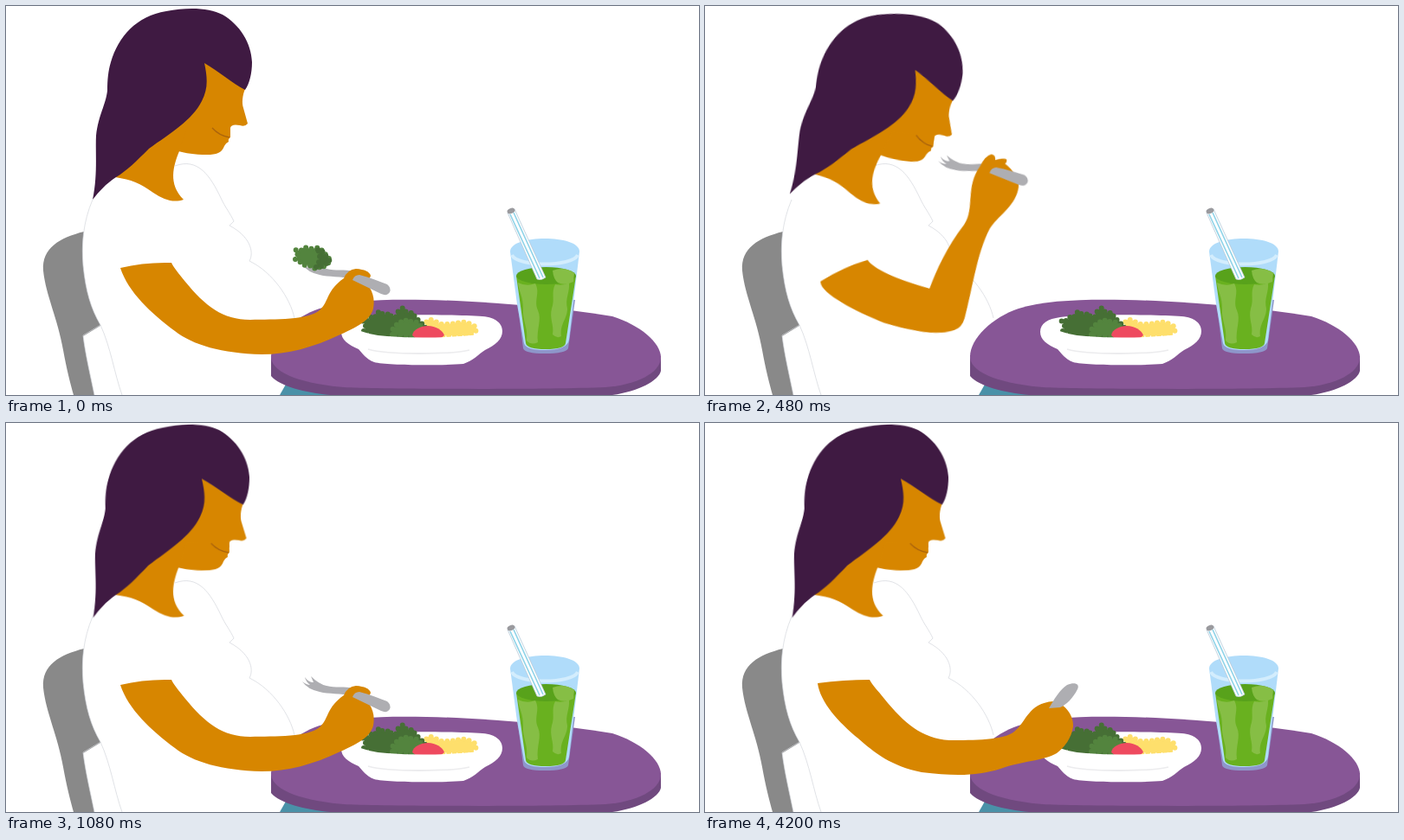
Recreate the animation shown at these times as an HTML page. Size 800x450 px, loop 4380 ms.

```html
<!DOCTYPE html>
<html lang="en">
<head>
<meta charset="utf-8">
<title>Healthy meal</title>
<style>
  html, body { margin: 0; width: 100%; height: 100%; overflow: hidden; background: #fff; }
  svg { display: block; width: 800px; height: 450px; }
  .skin { fill: #d78600; }
  .hair { fill: #3f1a42; }
  .steel { fill: #aeaeb2; }
  .seam { fill: none; stroke: #d3d6dc; stroke-width: .7; }
  .dark { fill: #466f35; stroke: #466f35; }
  .light { fill: #53843e; stroke: #53843e; }
  .corn { fill: #fedf6c; stroke: #fedf6c; }
  /* round dots along the edge make it frilly */
  .frill { stroke-width: 6; stroke-linecap: round; stroke-dasharray: 0 6.5; }

  .low, .mid, .high, .scoop, .food, .fork, .head, .shut, .open, .chew, .scooper {
    animation: 4.38s step-end infinite;
  }
  .low { animation-name: low; }
  .mid { animation-name: mid; }
  .high { animation-name: high; transform-origin: 200px 340px; }
  .scoop { animation-name: scoop; }
  .food { animation-name: food; }
  .fork { animation-name: fork; transform-origin: 390px 310px; }
  .head { animation-name: head; transform-origin: 160px 200px; }
  .shut { animation-name: shut; }
  .open { animation-name: open; }
  .chew { animation-name: chew; }

  @keyframes low {
    0%, 24.658% { opacity: 1; }
    3.653%, 95.89%, 100% { opacity: 0; }
  }
  @keyframes mid {
    0%, 7.306%, 24.658%, 100% { opacity: 0; }
    3.653%, 19.635% { opacity: 1; }
  }
  @keyframes high {
    0% { opacity: 0; transform: none; }
    7.306% { opacity: 1; transform: none; }
    10.959% { opacity: 1; transform: rotate(-4deg); }
    14.612% { opacity: 1; transform: translate(-3px, 2px); }
    19.635%, 100% { opacity: 0; transform: none; }
  }
  @keyframes scoop {
    0%, 100% { opacity: 0; }
    95.89% { opacity: 1; }
  }
  @keyframes food {
    0% { opacity: 1; }
    10.959%, 100% { opacity: 0; }
  }
  @keyframes fork {
    0%, 24.658% { opacity: 1; transform: none; }
    3.653%, 19.635% { opacity: 1; transform: translate(-21px, -68px); }
    7.306% { opacity: 1; transform: translate(-61px, -119px); }
    10.959% { opacity: 1; transform: translate(-72px, -123px) rotate(-4deg); }
    14.612% { opacity: 1; transform: translate(-62px, -119px) rotate(-2deg); }
    95.89%, 100% { opacity: 0; transform: none; }
  }
  @keyframes head {
    0% { transform: none; }
    10.959% { transform: rotate(6deg); }
    14.612%, 100% { transform: rotate(-1.27deg); }
  }
  @keyframes shut {
    0%, 10.959%, 24.658%, 34.703%, 44.749%, 54.795%, 100% { opacity: 1; }
    7.306%, 19.635%, 29.68%, 39.726%, 49.772% { opacity: 0; }
  }
  @keyframes open {
    0%, 10.959%, 100% { opacity: 0; }
    7.306% { opacity: 1; }
  }
  @keyframes chew {
    0%, 24.658%, 34.703%, 44.749%, 54.795%, 100% { opacity: 0; }
    19.635%, 29.68%, 39.726%, 49.772% { opacity: 1; }
  }
</style>
</head>
<body>
<svg viewBox="0 0 800 450">
  <!-- chair and clothes -->
  <path fill="#898989" d="M90 261C62 268 41 280 43 306C46 335 60 362 66 398C70 420 74 436 78 450H102C97 425 92 405 89 382L112 368V261Z"/>
  <path fill="#4a91a8" d="M324 436L316 450H376L345 438Z"/>
  <path fill="#fff" d="M100 224C89 250 87 275 89 300C92 330 98 350 109 369C121 395 125 425 134 450H316L333 361C328 338 308 308 281 295C287 284 281 266 258 254L263 249C250 228 235 182 205 182L150 190Z"/>
  <path class="seam" d="M100 224C89 250 87 275 89 300C92 330 98 350 109 369C121 395 125 425 134 450M109 369L89 381C92 405 97 425 102 450M195 185C222 175 236 197 248 222C253 233 259 240 263 249L258 254C281 266 287 284 281 295C308 308 328 338 333 361"/>

  <!-- table -->
  <path fill="#70497f" d="M306 404V428C316 440 345 447 374 450H700C730 446 754 433 756 422V405Z"/>
  <path fill="#875696" d="M306 407C305 385 332 360 362 350C400 338 460 339 520 341C580 344 640 349 700 359C732 369 757 390 756 408C754 424 730 438 692 441C620 444 430 443 390 441C345 437 308 426 306 407Z"/>

  <!-- plate -->
  <path fill="#fff" d="M387 377C387 367 396 362 410 360C440 356 520 357 550 359C566 360 573 368 573 376C573 386 565 392 553 398C545 403 540 410 528 414C500 416 440 416 425 412C415 408 412 402 407 397C395 392 387 386 387 377Z"/>
  <g class="frill">
    <path class="corn" d="M485 372Q483 362 492 363Q498 366 501 368Q514 368 521 367Q528 364 536 368Q543 370 543 375Q539 381 528 381H490Z"/>
    <path class="dark" d="M413 376Q418 370 411 364Q420 366 422 358Q429 362 430 353Q438 360 443 355Q444 361 450 360Q451 352 459 349Q460 356 471 355Q471 362 478 364Q480 369 484 370L482 382H430Z"/>
    <path class="light" d="M446 380Q444 374 450 371Q452 364 459 366Q464 360 468 366Q476 364 478 370Q485 372 480 382Z"/>
  </g>
  <path fill="#ee4a5f" d="M469 381C470 374 479 370 487 370C496 370 504 375 506 381L500 386H475Z"/>
  <path fill="#fff" d="M400 372Q418 381 440 382Q490 386 549 380L553 390Q480 402 405 389Z"/>
  <path fill="none" stroke="#ececee" stroke-width="1.8" d="M418 397Q435 402 477 402Q520 402 535 398"/>

  <!-- drink -->
  <path fill="#8e96ca" d="M590 340L597 396Q599 402 622 402Q646 402 649 396L657 340Z"/>
  <path fill="#b0dcfa" d="M582 284C582 264 662 264 662 284L654 352L650 386Q648 398 622 398Q600 398 598 390L590 345Z"/>
  <path fill="#69b11f" d="M589 312L600 390Q601 397 623 397Q645 397 646 390L658 312Z"/>
  <ellipse cx="623.5" cy="312" rx="34.5" ry="10" fill="#58a21b"/>
  <g fill="#86be45">
    <path d="M591 320Q601 325 611 321C617 332 609 340 614 352C619 363 612 374 614 389Q606 393 601 387C603 372 596 365 597 350C597 336 592 330 591 320Z"/>
    <path d="M631 306Q645 301 656 309L655 319Q645 324 637 320Q632 316 631 306Z"/>
    <path d="M634 322Q643 324 650 320C651 332 645 338 648 350C648 362 639 368 641 382Q636 385 631 380C633 369 627 362 630 350C634 339 629 332 634 322Z"/>
  </g>
  <path fill="none" stroke="#d3edfd" stroke-width="4" d="M584 288C590 302 654 302 660 288"/>
  <path fill="#fff" stroke="#b7c9d8" stroke-width=".8" d="M579 239L587 235L623 314Q618 318 613 316Z"/>
  <path fill="none" stroke="#8fd3e8" stroke-width="1.6" d="M582 241L616 315M586 239L620 314"/>
  <ellipse cx="583" cy="237" rx="4.6" ry="3" fill="#9a9a9e" transform="rotate(-24 583 237)"/>

  <!-- fork tines and leaf -->
  <g class="fork">
    <path class="steel" d="M345 294Q349 300 355 300L352 293Q361 302 370 304C380 307 390 304 402 307V316C385 312 373 314 362 311Q348 308 342 299Q347 303 351 303Q346 299 345 294Z"/>
    <g class="food">
      <g class="frill">
        <path class="light" d="M334 293Q339 289 334 282Q341 285 345 279Q352 282 357 280Q365 279 365 285Q373 289 374 296Q369 299 364 304Q359 299 356 304Q350 298 344 300Q339 295 334 293Z"/>
        <path class="dark" d="M360 282Q366 281 366 287Q372 290 374 296L365 300Q361 304 358 302Q365 292 360 282Z"/>
      </g>
    </g>
  </g>

  <!-- head -->
  <g class="head">
    <path class="skin" d="M228 64L276 96C273 103 272 112 274 118L279 136Q276 140 270 138Q260 136 259 141V146H238L200 168C193 185 187 206 205 224C193 228 182 224 170 216C155 205 145 201 126 198L150 165L210 100Z"/>
    <path class="skin shut" d="M259 140V152Q256 154 257 157Q253 159 252 162C249 170 243 172 232 172C217 172 207 170 199 168L210 140Z"/>
    <path class="skin open" d="M259 140L259 152Q249 152 241 147Q238 153 243 158L252 168Q245 172 243 178Q236 182 222 180Q210 174 199 168L210 140Z"/>
    <path class="skin chew" d="M259 140V152Q256 155 258 158Q254 162 253 167C249 177 243 179 232 178C217 177 207 172 199 168L210 140Z"/>
    <path class="shut" fill="none" stroke="#ab640c" stroke-width="1.3" d="M238 141Q246 150 258 152"/>
    <path class="chew" fill="none" stroke="#ab640c" stroke-width="1.3" d="M240 146Q248 152 258 153"/>
    <path class="hair" d="M100 224C106 195 103 170 104 150C107 125 115 115 117 98C117 85 118 75 121 65C130 35 150 12 185 6C210 1 235 2 250 10C270 22 283 42 284 65C284 78 281 90 276 97C262 90 245 75 229 66C233 85 233 96 226 110C215 132 190 147 165 165C150 180 140 190 127 198C115 206 107 215 100 224Z"/>
  </g>

  <!-- arm poses -->
  <path class="skin low" d="M132 303Q160 296 191 297C193 302 200 310 207 319C230 347 250 363 282 363C310 362 350 364 363 351C373 341 370 329 390 315Q394 305 404 304Q419 305 421 312Q420 317 413 318C424 327 426 340 424 350C421 362 409 370 386 380C355 395 325 403 295 403C250 402 215 392 195 376C168 356 141 331 132 303Z"/>
  <path class="skin mid" d="M132 308Q160 296 191 295C200 311 236 340 278 347C304 328 322 304 337 286C346 274 345 263 368 247Q373 237 383 236Q398 237 400 243Q399 248 392 250C403 260 405 273 402 283C396 299 377 312 363 331C346 358 335 384 313 394C290 400 248 396 209 374C175 353 143 329 132 308Z"/>
  <path class="skin high" d="M135 314Q163 299 191 293C196 303 223 318 260 331C270 309 283 285 305 260C319 242 309 217 328 194Q335 182 342 181Q347 182 346 188Q355 186 359 188Q360 191 357 193C369 204 373 216 370 224C364 244 344 253 334 267C317 295 310 333 298 368Q294 379 285 381C266 386 240 380 205 367C172 351 133 327 135 314Z"/>
  <g class="scoop">
    <path class="skin" d="M130 301Q160 297 190 297C193 303 200 310 207 319C230 347 250 365 282 367C310 367 345 367 357 357C371 346 373 324 402 322C417 325 426 340 425 351C423 365 415 375 406 382C391 391 365 391 341 400C316 408 290 409 250 404C215 397 195 381 177 365C154 346 133 323 130 301Z"/>
    <path class="steel" d="M397 330C402 321 410 308 418 303C427 299 433 302 430 308C425 318 417 326 410 329Z"/>
  </g>
  <path class="steel fork" d="M400 317Q402 311 408 311C420 314 432 319 440 322Q445 326 443 331Q440 336 433 333C422 328 411 322 400 317Z"/>
</svg>
</body>
</html>
```
